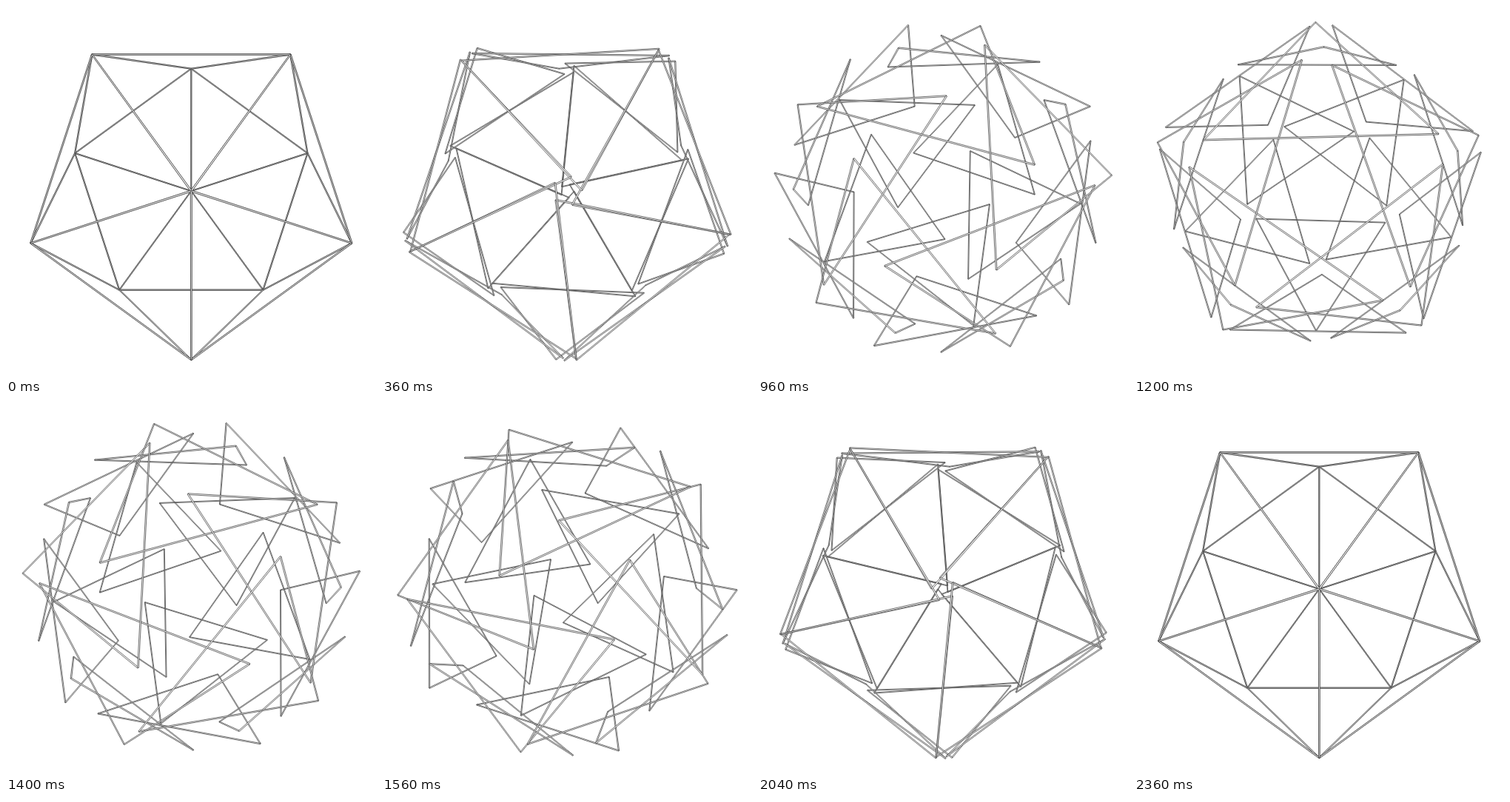
Write an HTML page with a canvas that moves like this. It is 500 px wide and 500 px high and loops after 2.4 s.

```html
<!DOCTYPE html>
<html lang="en">
<head>
<meta charset="utf-8">
<title>Turning icosahedron faces</title>
<style>
  html, body { margin: 0; width: 100%; height: 100%; overflow: hidden; background: #fff; }
  canvas { display: block; width: 500px; height: 500px; }
</style>
</head>
<body>
<canvas id="stage" width="500" height="500"></canvas>
<script>
const ctx = document.getElementById('stage').getContext('2d');

const STEP = 40, STEPS = 60;      // ms per step, steps per loop
const FOCAL = 600, EYE = 2.8;     // perspective, in units of the circumradius
const ROD = 0.0056;               // rod thickness

// Icosahedron seen along a five-fold axis; y points down, z towards the eye.
const H = 1 / Math.sqrt(5);
const ring = (start, z) => Array.from({ length: 5 }, (_, k) => {
  const a = (start + 72 * k) * Math.PI / 180;
  return [2 * H * Math.cos(a), 2 * H * Math.sin(a), z];
});
const near = ring(90, H), far = ring(126, -H);
const front = [0, 0, 1], back = [0, 0, -1];

const triangles = [];
for (let k = 0; k < 5; k++) {
  const n = (k + 1) % 5;
  triangles.push(
    [front, near[k], near[n]],
    [back, far[k], far[n]],
    [near[k], near[n], far[k]],
    [far[k], far[n], near[n]]
  );
}

const cross = (a, b) => [
  a[1] * b[2] - a[2] * b[1],
  a[2] * b[0] - a[0] * b[2],
  a[0] * b[1] - a[1] * b[0]
];

// Each corner circles the face centre: centre + cos * arm + sin * side.
const faces = triangles.map(tri => {
  const centre = [0, 1, 2].map(i => (tri[0][i] + tri[1][i] + tri[2][i]) / 3);
  const len = Math.hypot(...centre);
  const normal = centre.map(c => c / len);
  return tri.map(v => {
    const arm = v.map((c, i) => c - centre[i]);
    return { centre, arm, side: cross(arm, normal) };
  });
});

function project({ centre, arm, side }, cos, sin) {
  const [x, y, z] = centre.map((c, i) => c + cos * arm[i] + sin * side[i]);
  const s = FOCAL / (EYE - z);
  return { x: 250.3 + x * s, y: 250 + y * s, z, r: ROD * s / 2 };
}

function drawRod(a, b) {
  const dx = b.x - a.x, dy = b.y - a.y;
  const len = Math.hypot(dx, dy) || 1;
  const nx = -dy / len, ny = dx / len;
  ctx.beginPath();
  ctx.moveTo(a.x + nx * a.r, a.y + ny * a.r);
  ctx.lineTo(b.x + nx * b.r, b.y + ny * b.r);
  ctx.lineTo(b.x - nx * b.r, b.y - ny * b.r);
  ctx.lineTo(a.x - nx * a.r, a.y - ny * a.r);
  ctx.closePath();
  ctx.fill();
  ctx.stroke();
}

const ease = u => u < 0.5 ? 2 * u * u : 1 - 2 * (1 - u) * (1 - u);

function draw(step) {
  const angle = ease(step / (STEPS - 1)) * 2 * Math.PI / 3;
  const cos = Math.cos(angle), sin = Math.sin(angle);
  const rods = [];
  for (const face of faces) {
    const p = face.map(c => project(c, cos, sin));
    p.forEach((a, i) => rods.push([a, p[(i + 1) % 3]]));
  }
  rods.sort((m, n) => m[0].z + m[1].z - n[0].z - n[1].z);

  ctx.fillStyle = '#fff';
  ctx.fillRect(0, 0, 500, 500);
  ctx.strokeStyle = '#333';
  ctx.lineWidth = 0.7;
  ctx.lineJoin = 'round';
  for (const [a, b] of rods) drawRod(a, b);
}

const start = performance.now();
function tick() {
  const t = Math.max(0, performance.now() - start);
  draw(Math.floor(t / STEP) % STEPS);
  requestAnimationFrame(tick);
}
tick();
</script>
</body>
</html>
```
